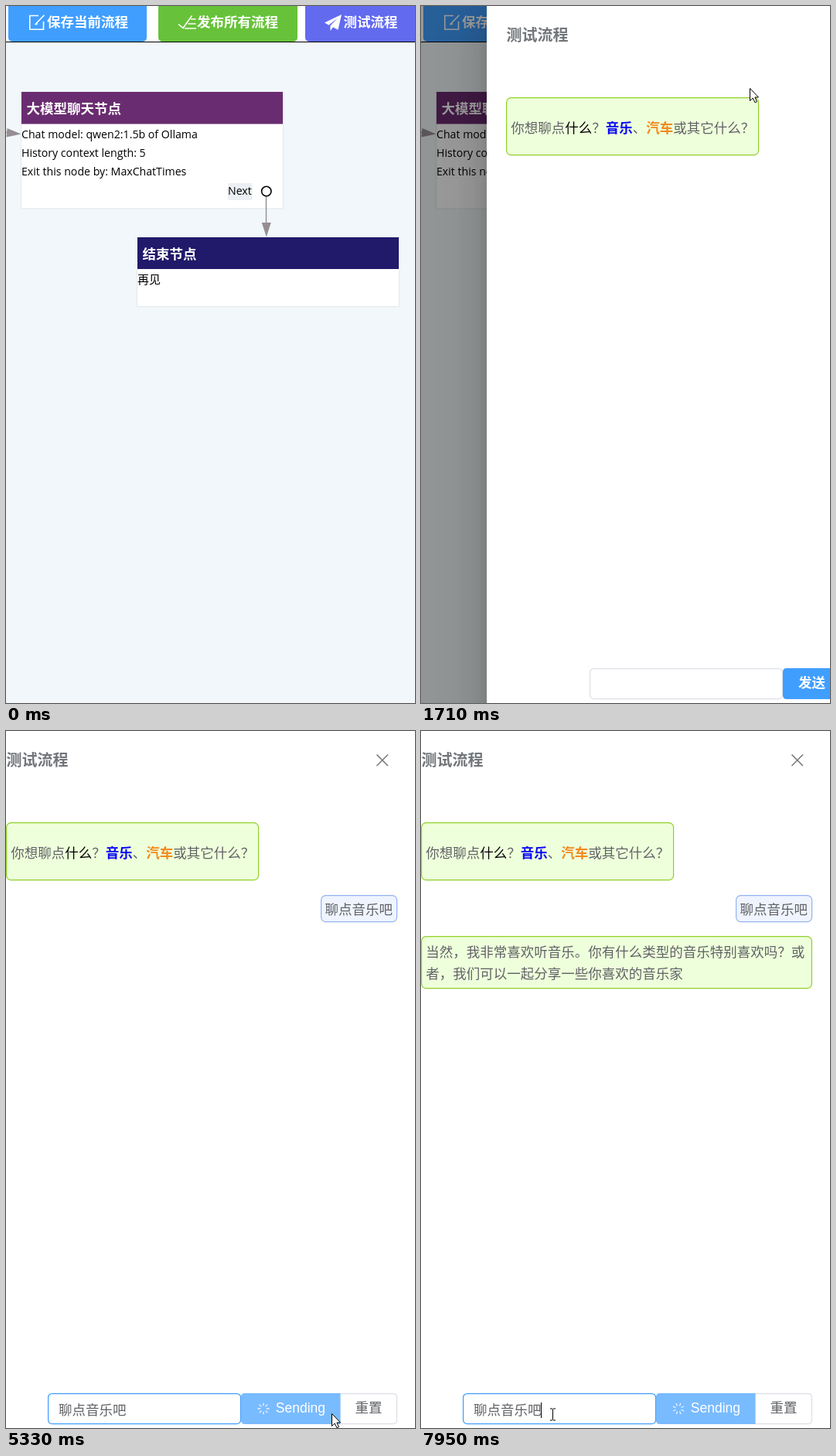
Recreate the animation shown at these times as an HTML page. Size 529 px wide and 901 px high, loop 8 s.

```html
<!DOCTYPE html>
<html lang="zh">
<head>
<meta charset="utf-8">
<style>
  html, body { margin: 0; width: 100%; height: 100%; overflow: hidden; background: #fff; }
  svg { display: block; width: 529px; height: 901px; }
  text { font: 17.5px "Noto Sans CJK SC", "Noto Sans CJK", sans-serif; fill: #606266; white-space: pre; }
  .b { font-weight: bold; }
  .w { fill: #fff; }
  .k { fill: #000; }
  .m { font-weight: 500; }
  .node text.en { font: 14.15px "Open Sans", "Noto Sans", sans-serif; fill: #000; }
  .line { fill: none; stroke: #fff; stroke-width: 1.6; }
  .green { fill: #eeffdb; stroke: #8fd028; stroke-width: 1.2; }
</style>
</head>
<body>
<svg viewBox="0 0 529 901">
  <!-- flow editor -->
  <rect width="529" height="901" fill="#f1f7fa"/>
  <rect width="529" height="46" fill="#fff"/>
  <rect y="46" width="529" height="1" fill="#000"/>
  <rect x="3" y="-9" width="179" height="55" rx="5" fill="#409eff"/>
  <rect x="197" y="-9" width="180" height="55" rx="5" fill="#67c23a"/>
  <rect id="test" x="387" y="-9" width="170" height="55" rx="5"/>
  <path class="line" d="M42 12.5H30.8V30.2H48.5V20M38 23.5L49.5 11.8M37.5 24l3.5-1"/>
  <path class="line" d="M223 23.5l6 5L240.5 12.5M239 17h6.5M235.5 23h10M231 29h15"/>
  <path class="w" d="M434 11L412 21.5l5.5 3.2L429 15.5 419.5 25.5v6.5l3.5-4.5 6.5 3.2z"/>
  <text class="b w" x="53" y="26.5">保存当前流程</text>
  <text class="b w" x="247" y="26.5">发布所有流程</text>
  <text class="b w" x="436.5" y="26.5">测试流程</text>

  <g class="node">
    <rect x="19.5" y="111.5" width="339" height="150.5" fill="#fff" stroke="#e9edef" stroke-width="1.5"/>
    <rect x="20" y="111" width="338" height="41.5" fill="#6a2c70"/>
    <text class="b w" x="26.5" y="139">大模型聊天节点</text>
    <text class="en" x="20" y="171">Chat model: qwen2:1.5b of Ollama</text>
    <text class="en" x="20" y="195">History context length: 5</text>
    <text class="en" x="20" y="219">Exit this node by: MaxChatTimes</text>
    <rect x="287" y="229" width="31.5" height="22" fill="#ecf0f4"/>
    <text class="en" x="287" y="244">Next</text>
    <rect x="169.5" y="298.5" width="339" height="90" fill="#fff" stroke="#e9edef" stroke-width="1.5"/>
    <rect x="170" y="299" width="338" height="41" fill="#21196a"/>
    <text class="b w" x="176.5" y="326.5">结束节点</text>
    <text class="k" x="170" y="358.5" style="font-size:15px">再见</text>
    <path d="M0 163l5 1M336.5 246v36" stroke="#968e92" stroke-width="1.4"/>
    <path d="M1.5 158L19.5 165.5 .5 169.5zM330.8 280h12L336.8 298.5z" fill="#968e92"/>
    <circle cx="336.8" cy="239.5" r="6.2" fill="#fff" stroke="#000" stroke-width="1.6"/>
  </g>

  <rect id="mask" width="529" height="901"/>

  <!-- test drawer with three stacked shadows -->
  <g id="drawer">
    <rect x="-45" width="596" height="965" opacity=".08" style="filter:blur(30px)"/>
    <rect x="-25" y="15" width="556" height="925" opacity=".12" style="filter:blur(20px)"/>
    <rect x="-15" y="20" width="536" height="905" opacity=".16" style="filter:blur(10px)"/>
    <rect x="-25" width="580" height="901" fill="#fff"/>
    <text class="b" x="0.5" y="45.3" style="font-size:20px;fill:#72767b">测试流程</text>
    <path d="M479.5 30.5l14.5 14.5m0-14.5l-14.5 14.5" stroke="#72767b" stroke-width="1.5"/>
    <rect class="green" x=".6" y="118.6" width="326" height="74" rx="6"/>
    <text x="6.3" y="163.5">你想聊点<tspan class="k">什么</tspan>？<tspan class="b" style="fill:#0a0af5">音乐</tspan>、<tspan class="b" style="fill:#f28a1e">汽车</tspan>或其它什么？</text>

    <g id="ask">
      <rect x="407.6" y="212.6" width="98" height="34" rx="6" fill="#eff4ff" stroke="#93b3f2" stroke-width="1.2"/>
      <text x="412.5" y="236.8">聊点音乐吧</text>
    </g>
    <g id="reply">
      <rect id="bubble" class="green" x=".6" y="265.6" rx="6"/>
      <text id="row1" x="6.3" y="292.3"></text>
      <text id="row2" x="6.3" y="320.3"></text>
    </g>

    <g id="field">
      <rect id="box" x="108.6" y="856.6" width="249" height="39" rx="5" fill="#fff" stroke-width="1.25"/>
      <text id="typed" x="122" y="884">聊点音乐吧</text>
      <rect id="caret" y="868" width="1" height="20"/>
    </g>
    <path d="M432 856.6h69q4.5 0 4.5 5v29q0 5-4.5 5h-69z" fill="#fff" stroke="#dcdfe6" stroke-width="1.2"/>
    <text class="m" x="451.5" y="881.3">重置</text>
    <path id="send"/>
    <text id="sendText" class="b w" x="378" y="881.3">发送</text>
    <g id="busy">
      <path id="spin" class="line" style="stroke-width:1.3;opacity:.85"/>
      <text class="w" x="348.8" y="881" style="font-family:'Liberation Sans',Arial,sans-serif">Sending</text>
    </g>
  </g>

  <g id="cursor" stroke="#000" stroke-linejoin="round">
    <path id="arrow" fill="#fff" d="M.5.5V16.5L4.2 13 7 18.8 9.5 17.7 6.9 12H11.5z"/>
    <path id="hand" fill="#fff" d="M-1.5 1.5Q0-.5 1.5 1.5V6.5Q3.5 5.5 4.5 7.5 6.5 6.5 7.5 8.5 10.5 8 10.5 10.5V14.5L8.5 18V20.5H-1V18L-6 12Q-6 9.5-3.5 10.5L-1.5 12.5zM1.5 6.5v4M4.5 7.5v3M7.5 8.5v2.5"/>
    <path id="beam" fill="none" d="M-3.5-7.5h3M.5-7.5h3M0-7V7M-3.5 7.5h3M.5 7.5h3"/>
  </g>
</svg>
<script>
const $ = id => document.getElementById(id);
const set = (id, attrs) => { for (const k in attrs) $(id).setAttribute(k, attrs[k]); };
const show = (id, on) => { $(id).style.display = on ? '' : 'none'; };
const clamp = x => Math.max(0, Math.min(1, x));
const LOOP = 8000, SENT = 4720, EM = 17.5, ROW = 28;

// screen refreshes: first, last, count
const bursts = [[270, 1040, 12], [1100, 1240, 3], [1440, 2190, 12], [2260, 2470, 4],
  [2610, 2820, 4], [3150, 3220, 2], [3420, 3770, 6], [4050, 4050, 1], [4320, 4320, 1],
  [4720, 5470, 12], [5540, 6290, 12], [6350, 7110, 12], [7180, 7950, 12]];
const ticks = [0];
for (const [a, b, n] of bursts)
  for (let i = 0; i < n; i++) ticks.push(Math.round((a + (b - a) * i / Math.max(1, n - 1)) / 10) * 10);

// pointer path: time, x, y
const path = [[270, 522, 879], [1040, 479, 36], [1240, 478, 37], [1440, 475, 31], [1580, 475, 31],
  [1710, 425, 106], [2190, 246, 838], [2470, 242, 858], [2610, 242, 858], [2820, 240, 876],
  [3350, 240, 876], [3630, 402, 881], [3770, 421, 882], [4050, 420, 882], [4720, 421, 882],
  [5330, 421, 882], [5470, 320, 884], [5680, 170.5, 884.5], [6420, 170.5, 884.5], [7110, 170.5, 883.5]];

const tokens = '当然|，|我|非常|喜欢|听|音乐|。|你|有什么|类型|的|音乐|特别|喜欢|吗|？|或|者|，|我们|可以|一起|分享|一些|你|喜欢的|音乐|家'.split('|');

function pointer(t) {
  let i = path.findIndex(p => p[0] > t);
  if (i < 0) i = path.length;
  const a = path[Math.max(0, i - 1)], b = path[i] || a;
  const u = b === a ? 0 : clamp((t - a[0]) / (b[0] - a[0])), s = u * u * (3 - 2 * u);
  return [1, 2].map(k => Math.round(2 * (a[k] + (b[k] - a[k]) * s)) / 2);
}

// CSS "ease" curve
function ease(x) {
  let lo = 0, hi = 1;
  const curve = (s, a, b) => 3 * s * (1 - s) ** 2 * a + 3 * s * s * (1 - s) * b + s ** 3;
  for (let i = 0; i < 24; i++) {
    const s = (lo + hi) / 2;
    if (curve(s, .25, .25) < x) lo = s; else hi = s;
  }
  return curve(lo, .1, 1);
}

function mix(a, b, u) {
  return `rgb(${a.map((v, i) => Math.round(v + (b[i] - v) * clamp(u)))})`;
}

function drawPointer(t) {
  const [x, y] = pointer(t);
  const hand = (t >= 1040 && t < 1560) || (t > 3480 && t < SENT && x > 358);
  const beam = (t >= 2400 && t < SENT && x <= 358) || (t > SENT && x < 304);
  show('cursor', t >= 270);
  show('hand', hand);
  show('beam', beam);
  show('arrow', !hand && !beam);
  set('cursor', { transform: `translate(${x} ${y})` });
}

function drawReply(t) {
  const count = Math.floor((t - 5470) / 86) + 1;
  show('reply', count > 0);
  const text = tokens.slice(0, Math.max(0, count)).join('');
  $('row1').textContent = text.slice(0, ROW);
  $('row2').textContent = text.slice(ROW);
  const wide = text.length > ROW;
  set('bubble', { width: wide ? 504.8 : 11.3 + EM * text.length, height: wide ? 67 : 39 });
}

function drawForm(t) {
  const sent = t >= SENT, typed = t >= 3150;
  show('ask', sent);
  show('busy', sent);
  show('sendText', !sent);
  show('typed', typed);
  set('field', { transform: `translate(${sent ? -54 : 0} 0)` });
  set('box', { stroke: t >= 2610 ? '#409eff' : t >= 2400 ? '#c0c4cc' : '#dcdfe6' });
  set('send', {
    d: `M432.5 856H${sent ? 309 : 363}q-5 0-5 5v30q0 5 5 5H432.5z`,
    fill: mix([64, 158, 255], [121, 187, 255], sent ? 1 : (t - 3560) / 115)
  });
  const blink = (t >= 2680 && t < 3150) || (t >= 3220 && t < 3770) || (t >= 4320 && t < SENT) ||
    (t >= 6410 && (t - 6410) % 1060 < 530);
  show('caret', blink);
  set('caret', { x: typed ? 209 : 122 });
  set('spin', { transform: `translate(333 876) rotate(${(t - 5330) * .18})` });
}

function draw(t) {
  const p = ease(clamp((t - 1563.4) / 293));
  show('drawer', p > 0);
  set('drawer', { transform: `translate(${Math.round(556 * (1 - p))} 0)` });
  set('mask', { 'fill-opacity': p / 2 });
  set('test', {
    fill: t >= 1440 ? '#5d63db' : mix([98, 106, 239], [145, 151, 244], (t - 1060) / 100)
  });
  drawForm(t);
  drawReply(t);
  drawPointer(t);
}

let spokes = '';
for (let i = 0; i < 8; i++) {
  const c = Math.cos(i * Math.PI / 4), s = Math.sin(i * Math.PI / 4);
  spokes += `M${3.8 * c} ${3.8 * s}L${7.6 * c} ${7.6 * s}`;
}
set('spin', { d: spokes });

function frame() {
  const now = performance.now() % LOOP;
  draw(ticks.filter(t => t <= now).pop());
  requestAnimationFrame(frame);
}
frame();
</script>
</body>
</html>
```
